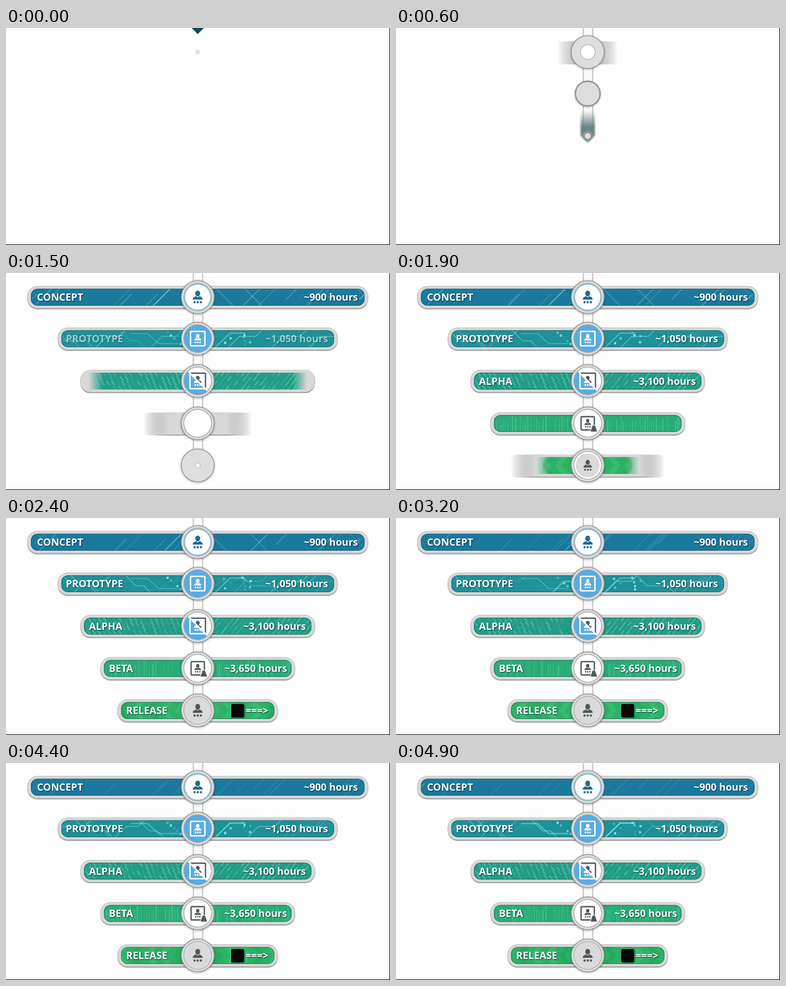
An HTML page with a canvas for the animation above (5000 ms loop, 694x392 px).

```html
<!DOCTYPE html>
<html lang="en">
<head>
<meta charset="utf-8">
<title>Project stages</title>
<style>
  html, body { margin: 0; width: 100%; height: 100%; overflow: hidden; background: #fefefe; }
  canvas, svg { position: absolute; left: 0; top: 0; width: 694px; height: 392px; }
  text { font: 700 18px "Open Sans", "Noto Sans", sans-serif; fill: #fff; }
  g { filter: drop-shadow(1px 1px 1px rgba(0, 30, 40, .75)); }
</style>
</head>
<body>
<canvas id="stage" width="694" height="392"></canvas>
<svg id="labels" viewBox="0 0 694 392"></svg>
<script>
const ctx = document.getElementById('stage').getContext('2d');
const labels = document.getElementById('labels');
const CX = 346.5, LOOP = 5000, STEP = 100, TAU = Math.PI * 2;
const BLUE = '#58ace2', DARK = '#50575a';

// y: centre, half: half width of the bar, lx / rx: text edges
const rows = [
  { y: 43.5, half: 308, delay: 0, color: '#1b799d', glow: '#8fdcf6', left: 'CONCEPT', lx: 56, right: '~900 hours', rx: 636 },
  { y: 118.5, half: 253, delay: 230, color: '#1f9199', glow: '#8ff0f0', left: 'PROTOTYPE', lx: 108, right: '~1,050 hours', rx: 582 },
  { y: 195, half: 212, delay: 500, color: '#229c86', glow: '#74dcb4', left: 'ALPHA', lx: 150, right: '~3,100 hours', rx: 542 },
  { y: 271.5, half: 176, delay: 770, color: '#28aa76', glow: '#6cdca4', left: 'BETA', lx: 186, right: '~3,650 hours', rx: 508 },
  { y: 347.5, half: 145, delay: 1000, color: '#2cb266', glow: '#53cf83', left: 'RELEASE', lx: 217, right: '===>', rx: 474 }
];

const ramp = (t, a, b) => Math.min(1, Math.max(0, (t - a) / (b - a)));
const ease = (t, a, b) => { const x = ramp(t, a, b); return x * x * (3 - 2 * x); };
const mix = (a, b, k) => a + (b - a) * k;
const rand = n => { const v = Math.sin(n * 127.1 + 3.7) * 43758.5453; return v - Math.floor(v); };
const wrap = (v, n) => ((v % n) + n) % n;

function svgEl(name, attrs, parent, text) {
  const el = document.createElementNS('http://www.w3.org/2000/svg', name);
  for (const k in attrs) el.setAttribute(k, attrs[k]);
  if (text) el.textContent = text;
  return parent.appendChild(el);
}

rows.forEach((r, i) => {
  r.label = svgEl('g', {}, labels);
  const y = r.y + 6.5;
  svgEl('text', { x: r.lx, y }, r.label, r.left);
  svgEl('text', { x: r.rx, y, 'text-anchor': 'end' }, r.label, r.right);
  if (i === 4) svgEl('rect', { x: 407, y: 336, width: 23, height: 24, rx: 2, fill: '#050807' }, r.label);
});

function disc(x, y, r, fill) {
  ctx.beginPath();
  ctx.arc(x, y, Math.max(0, r), 0, TAU);
  ctx.fillStyle = fill;
  ctx.fill();
}

function ring(x, y, r, color, width) {
  ctx.beginPath();
  ctx.arc(x, y, Math.max(0, r), 0, TAU);
  ctx.strokeStyle = color;
  ctx.lineWidth = width;
  ctx.stroke();
}

function line(points, color, width, alpha) {
  ctx.globalAlpha = alpha;
  ctx.strokeStyle = color;
  ctx.lineWidth = width;
  ctx.beginPath();
  points.forEach(p => ctx.lineTo(p[0], p[1]));
  ctx.stroke();
  ctx.globalAlpha = 1;
}

function pill(half, y, h, r) {
  ctx.beginPath();
  ctx.roundRect(CX - half, y - h / 2, half * 2, h, r);
}

// Horizontal fill that fades out towards both ends.
function soft(color, half, edge) {
  if (!edge) return color;
  const g = ctx.createLinearGradient(CX - half, 0, CX + half, 0);
  const s = Math.min(.5, edge / (2 * half));
  g.addColorStop(0, color + '00');
  g.addColorStop(s, color);
  g.addColorStop(1 - s, color);
  g.addColorStop(1, color + '00');
  return g;
}

const patterns = [
  function slants(r, t) {
    const fade = mix(.85, .32, ramp(t, 1400, 4200));
    for (let i = 0; i < 26; i++) {
      const x = 40 + wrap(rand(i) * 610 + t * mix(-.03, .03, rand(i + 50)), 610);
      const dir = rand(i + 90) < mix(.3, 0, ramp(t, 2300, 3300)) ? -1 : 1;
      const lo = rand(i + 130) < .6 ? 16 : 4, hi = rand(i + 170) < .6 ? 16 : 6;
      line([[x - lo * dir, r.y + lo], [x + hi * dir, r.y - hi]], r.glow,
        mix(.8, 2, rand(i + 210)), fade * mix(.3, 1, rand(i + 250)));
    }
  },
  function circuits(r, t) {
    const pulse = i => .35 + .35 * Math.sin(t / 420 + i * 1.9);
    for (let i = 0; i < 15; i++) {
      const x = 96 + wrap(rand(i + 7) * 500 + t * .012, 500);
      const run = 14 + rand(i + 20) * 26, d = rand(i + 33) < .5 ? 1 : -1;
      line([[x - 20, r.y + 16 * d], [x, r.y - 4 * d], [x + run, r.y - 4 * d], [x + run + 12, r.y - 16 * d]],
        r.glow, 1.3, pulse(i) * .75);
    }
    const k = .45 + .4 * ramp(t, 3900, 4800);
    line([[378, r.y + 16], [405, r.y - 10], [432, r.y - 10]], r.glow, 2, k);
    line([[226, r.y - 9], [256, r.y - 9], [276, r.y + 9], [312, r.y + 9]], r.glow, 1.6, k * .8);
    ctx.fillStyle = '#b9f6f4';
    for (let i = 0; i < 16; i++) {
      const x = i < 11 ? 378 + rand(i + 60) * 68 : 290 + (i - 11) * 6;
      const y = i < 11 ? r.y - 13 + rand(i + 80) * 26 : r.y - 13 + (i - 11) * 5;
      ctx.globalAlpha = Math.max(0, pulse(i));
      ctx.fillRect(Math.round(x), Math.round(y), 4, 4);
    }
    ctx.globalAlpha = 1;
  },
  function dashes(r, t) {
    ctx.lineCap = 'round';
    for (let i = 0; i < 180; i++) {
      const x = CX - 206 + (i % 45) * 9.3 + Math.floor(i / 45) * 3;
      const y = r.y - 12 + Math.floor(i / 45) * 8;
      const d = x < CX ? -1 : 1;
      const a = .28 + .25 * Math.sin(t / 500 + rand(i) * 6);
      line([[x - 3 * d, y + 3], [x + 2 * d, y - 3]], r.glow, 2.2, a);
    }
    ctx.lineCap = 'butt';
  },
  function streaks(r, t) {
    for (let i = 0; i < 80; i++) {
      const x = CX - 170 + i * 4.25 + rand(i) * 2;
      const top = r.y - 16 + rand(i + 300) * 12;
      const a = .25 + .2 * Math.sin(t / 450 + rand(i + 400) * 6);
      line([[x, top], [x, r.y + 16]], r.glow, 1 + rand(i + 500) * 1.4, a);
    }
  },
  function chevrons(r, t) {
    for (let i = 0; i < 10; i++) {
      const d = i % 2 ? 1 : -1;
      const x = CX + d * (20 + wrap(Math.floor(i / 2) * 26 + t * .015, 130));
      line([[x - 9 * d, r.y - 18], [x + 5 * d, r.y], [x - 9 * d, r.y + 18]],
        i % 4 < 2 ? r.glow : '#1c9a52', 9, .3);
    }
  }
];

function bar(r, i, tau, t) {
  const grow = ease(tau, 520, 960);
  if (!grow) return;
  const half = 30 + (r.half - 30) * grow;
  const edge = grow < 1 ? 45 : 0;
  ctx.save();
  pill(r.half, r.y + 1.5, 41, 18);
  ctx.fillStyle = soft('#909090', half, edge);
  ctx.fill();
  pill(r.half, r.y + .3, 40.5, 18);
  ctx.fillStyle = soft('#d8d8d8', half, edge);
  ctx.fill();
  if (!edge) {
    pill(r.half - .5, r.y + .3, 39.5, 17.5);
    ctx.strokeStyle = '#c2c2c2';
    ctx.lineWidth = 1;
    ctx.stroke();
  }
  const tint = ease(tau, 730, 1040);
  if (tint) {
    const inner = r.half - 6.5;
    const w = 32 + (inner - 32) * tint;
    pill(inner, r.y + .3, 30.5, 12);
    ctx.fillStyle = soft(r.color, w, tint < 1 ? 26 : 0);
    ctx.fill();
    ctx.clip();
    if (tint < 1) {
      ctx.beginPath();
      ctx.rect(CX - w + 12, 0, 2 * w - 24, 392);
      ctx.clip();
    }
    patterns[i](r, t);
    if (tint === 1) {
      pill(inner, r.y + .3, 30.5, 12);
      ctx.strokeStyle = 'rgba(0,50,60,.45)';
      ctx.lineWidth = 2;
      ctx.stroke();
    }
  }
  ctx.restore();
}

function person(color, s) {
  ctx.save();
  ctx.scale(s, s);
  ctx.fillStyle = color;
  ctx.beginPath();
  ctx.ellipse(0, -6.5, 4.4, 5.2, 0, 0, TAU);
  ctx.fill();
  ctx.beginPath();
  ctx.moveTo(-9, 4.5);
  ctx.quadraticCurveTo(-9, -.2, -3, -1.5);
  ctx.lineTo(0, .5);
  ctx.lineTo(3, -1.5);
  ctx.quadraticCurveTo(9, -.2, 9, 4.5);
  ctx.fill();
  for (const x of [-5.7, 0, 5.7]) disc(x, 9.3, 2.1, color);
  ctx.restore();
}

function frame(half, color, width) {
  ctx.strokeStyle = color;
  ctx.lineWidth = width;
  ctx.beginPath();
  ctx.roundRect(-half, -half, half * 2, half * 2, 1.5);
  ctx.stroke();
}

function wedge(sign) {
  ctx.beginPath();
  ctx.moveTo(-30, -30);
  ctx.lineTo(30, 30);
  ctx.lineTo(30 * sign, -30 * sign);
  ctx.clip();
}

const icons = [
  () => {
    ring(0, 0, 23.5, '#62b2dc', 1.3);
    person('#23698f', 1);
  },
  () => {
    disc(0, 0, 25, BLUE);
    frame(13, '#fff', 2.6);
    person('#fff', .72);
  },
  () => {
    ctx.save();
    wedge(-1);
    disc(0, 0, 25, BLUE);
    frame(14, '#fff', 2.6);
    person('#fff', .78);
    ctx.restore();
    ctx.save();
    wedge(1);
    frame(14, DARK, 2.4);
    person(DARK, .78);
    ctx.restore();
    line([[-17, -17], [17, 17]], '#fff', 2.5, 1);
  },
  () => {
    frame(12, DARK, 2.4);
    person(DARK, .68);
    ctx.beginPath();
    ctx.moveTo(9, 4);
    ctx.lineTo(13, 4);
    ctx.lineTo(17, 15);
    ctx.lineTo(5, 15);
    ctx.closePath();
    ctx.fillStyle = DARK;
    ctx.strokeStyle = '#fff';
    ctx.lineWidth = 2;
    ctx.stroke();
    ctx.fill();
  },
  () => {
    disc(0, 0, 25, '#dadada');
    person(DARK, 1);
  }
];

function knob(r, i, tau) {
  if (tau < 0) return;
  const size = tau < 230 ? mix(4, 12, tau / 230) : mix(12, 30, ease(tau, 230, 480));
  ctx.save();
  if (size > 8) {
    ctx.shadowColor = 'rgba(0,0,0,.4)';
    ctx.shadowBlur = 4;
    ctx.shadowOffsetY = 1;
  }
  disc(CX, r.y, size, '#dedede');
  ctx.restore();
  if (size > 5) ring(CX, r.y, size - .3, '#929292', mix(4, 1.3, ease(tau, 230, 480)));
  const hole = mix(4.5, 25, ease(tau, 500, 720));
  if (tau >= 400) {
    disc(CX, r.y, hole, '#fff');
    ring(CX, r.y, hole, '#b0b0b0', 1.2);
  }
  const s = ease(tau, 700, 960);
  if (s) {
    ctx.save();
    ctx.translate(CX, r.y);
    ctx.scale(s, s);
    icons[i]();
    ctx.restore();
    ring(CX, r.y, 25.3, '#adadad', 1.2);
  }
}

function stem(tip) {
  const end = Math.min(tip - 20, 347);
  if (end <= 0) return;
  ctx.fillStyle = '#fafafa';
  ctx.fillRect(338, 0, 17, end);
  for (const x of [338, 355]) {
    ctx.fillStyle = '#e3e3e3';
    ctx.fillRect(x - 1, 0, 3, end);
    ctx.fillStyle = '#b9b9b9';
    ctx.fillRect(x, 0, 1, end);
  }
}

function arrow(t, tip) {
  const alpha = 1 - ramp(t, 500, 1200) * .75;
  if (t >= 1200) return;
  const k = ramp(t, 0, 900);
  const rgb = [mix(18, 130, k), mix(76, 138, k), mix(84, 138, k)].map(Math.round).join();
  const g = ctx.createLinearGradient(0, tip - 58, 0, tip);
  g.addColorStop(0, `rgba(${rgb},0)`);
  g.addColorStop(.5, `rgba(${rgb},${alpha})`);
  g.addColorStop(1, `rgba(${rgb},${alpha})`);
  ctx.save();
  ctx.filter = `blur(${mix(.4, 2, k)}px)`;
  ctx.fillStyle = g;
  ctx.beginPath();
  for (const [x, y] of [[0, 0], [13, -13], [13, -58], [-13, -58], [-13, -13]]) ctx.lineTo(CX + x, tip + y);
  ctx.fill();
  ctx.restore();
}

function draw(now) {
  const t = Math.floor((now % LOOP) / STEP) * STEP;
  const tip = 11 + t * .327;
  ctx.fillStyle = '#fefefe';
  ctx.fillRect(0, 0, 694, 392);
  stem(tip);
  arrow(t, tip);
  rows.forEach((r, i) => {
    const tau = t - r.delay;
    bar(r, i, tau, t);
    knob(r, i, tau);
    r.label.style.opacity = ease(tau, 1130, 1400);
  });
  ctx.fillStyle = '#000';
  ctx.fillRect(693, 0, 1, 392);
  ctx.fillRect(0, 391, 694, 1);
}

const start = performance.now();
function tick() {
  draw(performance.now() - start);
  requestAnimationFrame(tick);
}
tick();
</script>
</body>
</html>
```
